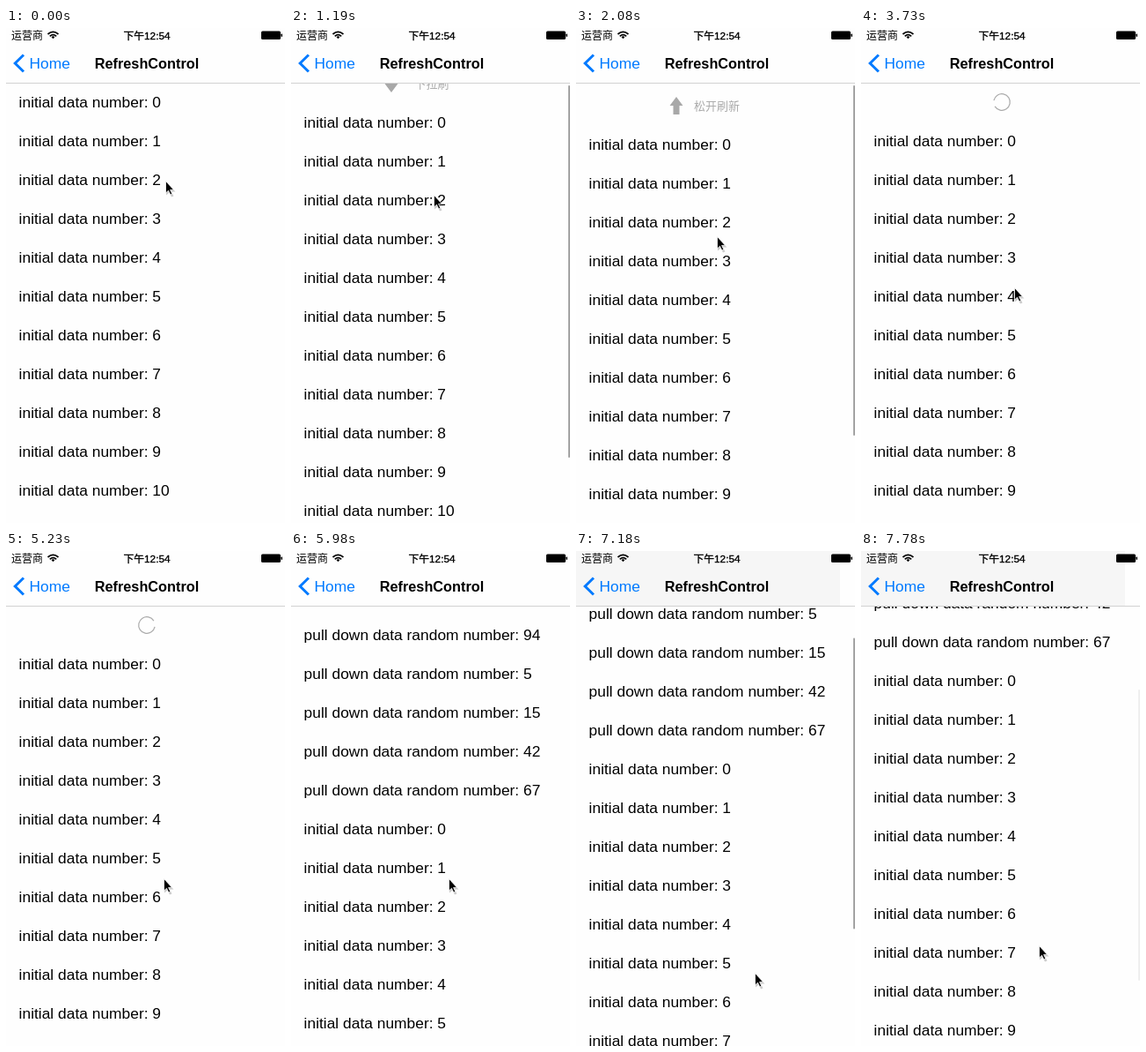
Recreate the animation shown at these times as an HTML page. Size 317 by 561 pixels, loop 8 s.

```html
<!DOCTYPE html>
<html lang="en">
<head>
<meta charset="utf-8">
<title>Pull to refresh</title>
<style>
  html, body { margin: 0; width: 100%; height: 100%; overflow: hidden; background: #fefefe; }
  svg { display: block; width: 100%; height: 100%; font: 17.4px "Liberation Sans", "Noto Sans CJK SC", "Noto Sans CJK", sans-serif; }
  .blue { fill: #007aff; }
  .hint { font-size: 13px; fill: #aaa; }
  .status { font-size: 12px; }
  .time { font-size: 11.8px; stroke: #000; stroke-width: .35; }
  .title { font-size: 16.3px; font-weight: bold; }
  .line { fill: none; stroke: #007aff; stroke-width: 3; }
</style>
</head>
<body>
<svg viewBox="0 0 317 561">
  <rect width="317" height="561" fill="#fefefe"/>
  <g id="rows"></g>
  <g id="pull">
    <path id="arrow" d="M0 -10 L7.5 0 H3.5 V10 H-3.5 V0 H-7.5 Z" fill="#a8a8a8"/>
    <text id="hint" class="hint" x="160" y="4.8" text-anchor="middle"></text>
  </g>
  <circle id="spinner" r="9.3" fill="none" stroke="#aaa" stroke-width="1.2" pathLength="360" stroke-dasharray="316 44"/>
  <rect id="indicator" x="315" width="2" rx="1"/>

  <rect width="317" height="62" fill="#fefefe"/>
  <rect id="tint" width="300" height="62" fill="#f6f6f6"/>
  <rect y="62" width="317" height="1" fill="#d2d2d2"/>
  <text class="status" x="6" y="12.7">运营商</text>
  <g fill="none" stroke="#000" stroke-width="1.7">
    <path d="M47.5 7 Q53.5 1.8 59.5 7 M49.8 9.3 Q53.5 6 57.2 9.3"/>
    <path d="M51.5 10 L53.5 12.3 L55.5 10 Q53.5 8.7 51.5 10Z" fill="#000" stroke="none"/>
  </g>
  <text class="time" x="160" y="12.7" text-anchor="middle">下午12:54</text>
  <rect x="290" y="3.5" width="22" height="9.5" rx="1.5"/>
  <rect x="312.5" y="6.5" width="1.5" height="3.5" rx=".7"/>
  <path class="line" d="M20 30.5 L10.3 40 L20 49.5"/>
  <text class="blue" x="26.5" y="46">Home</text>
  <text class="title" x="160" y="46" text-anchor="middle">RefreshControl</text>

  <g id="cursor">
    <path d="M1 2 V16.5 L4.5 13.5 L7 18.5 L9.5 17.5 L7 12.5 H11.5 Z" opacity=".2"/>
    <path d="M.5 .5 V14 L3.5 11.2 L5.8 16 L7.8 15.1 L5.6 10.4 H9.6 Z" stroke="#fff" stroke-width=".8"/>
  </g>
</svg>
<script>
const LOOP = 8000, STEP = 150, PHASE = 130, ROW = 44;
const PRESS = 730, RELEASE = 2980, RELOAD = 5980, SCROLL = 7030, END = 7780;
const $ = id => document.getElementById(id);
const place = (el, x, y, angle = 0) =>
  el.setAttribute("transform", `translate(${x} ${y}) rotate(${angle})`);
const show = (el, on) => el.setAttribute("visibility", on ? "visible" : "hidden");
const clamp = (v, low, high) => Math.min(high, Math.max(low, v));

// Quadratic ease-out from 0 to 1 between two times.
const ease = (t, from, to) => 1 - (1 - clamp((t - from) / (to - from), 0, 1)) ** 2;

// The screen refreshes on a fixed beat.
const snap = t => clamp(Math.floor((t - PHASE) / STEP) * STEP + PHASE, 0, END);

const moves = [
  { from: 0, to: 430, x: 164, y: 131 },
  { from: PRESS, to: 2080, x: 160, y: 236 },
  { from: 2830, to: 3730, x: 174, y: 294 },
  { from: 3730, to: 4930, x: 179, y: 371 },
  { from: 6280, to: 6730, x: 200, y: 433 },
  { from: 6880, to: SCROLL, x: 203, y: 495 },
  { from: SCROLL, to: END, x: 202, y: 447 },
];

function cursorAt(t) {
  let x = 181, y = 173;
  for (const move of moves) {
    const k = ease(t, move.from, move.to);
    x += (move.x - x) * k;
    y += (move.y - y) * k;
  }
  return { x: Math.round(x), y: Math.round(y) };
}

// The list follows the finger at about half speed, then springs back.
function offsetAt(t, cursorY) {
  if (t < PRESS) return 0;
  if (t < RELEASE) return Math.max(0, Math.round((cursorY - 144) * .522));
  return Math.round(48 - 4 * ease(t, RELEASE - STEP, RELEASE + STEP)
    - 44 * ease(t, RELOAD - STEP, RELOAD + STEP) - 157 * ease(t, SCROLL, END));
}

const indicatorOpacity = t => .36 * (
  ease(t, PRESS, PRESS + STEP) - ease(t, RELEASE - STEP, RELEASE + 2 * STEP) +
  ease(t, SCROLL, SCROLL + STEP) - ease(t, END - STEP, END + 100));

const initial = Array.from({ length: 12 }, (_, i) => `initial data number: ${i}`);
const added = [94, 5, 15, 42, 67].map(n => `pull down data random number: ${n}`);
const rowText = lines => lines.map((line, i) =>
  `<text x="14.6" y="${90 + i * ROW}">${line}</text>`).join("");
let wasReloaded;

function draw(now) {
  const t = snap(now % LOOP);
  const cursor = cursorAt(t);
  const offset = offsetAt(t, cursor.y);
  const reloaded = t >= RELOAD;

  if (reloaded !== wasReloaded) {
    $("rows").innerHTML = rowText(reloaded ? [...added, ...initial] : initial);
    wasReloaded = reloaded;
  }
  place($("rows"), 0, offset);
  place($("cursor"), cursor.x, cursor.y);

  const ready = offset >= ROW;
  show($("pull"), t < RELEASE && offset > 0);
  place($("pull"), 0, 40 + offset);
  place($("arrow"), 114, 0, ready ? 0 : 180);
  $("hint").textContent = ready ? "松开刷新" : "下拉刷";

  show($("spinner"), t >= RELEASE && !reloaded);
  place($("spinner"), 160, 84, (t - RELEASE) * .36 - 78);

  const scrolled = Math.max(0, -offset);
  $("indicator").setAttribute("y", 65 + scrolled * .586);
  $("indicator").setAttribute("height", reloaded ? 330 : 445 - offset);
  $("indicator").setAttribute("opacity", indicatorOpacity(t));
  show($("tint"), scrolled > 0);
}

const start = performance.now();
function frame() {
  draw(performance.now() - start);
  requestAnimationFrame(frame);
}
frame();
</script>
</body>
</html>
```
